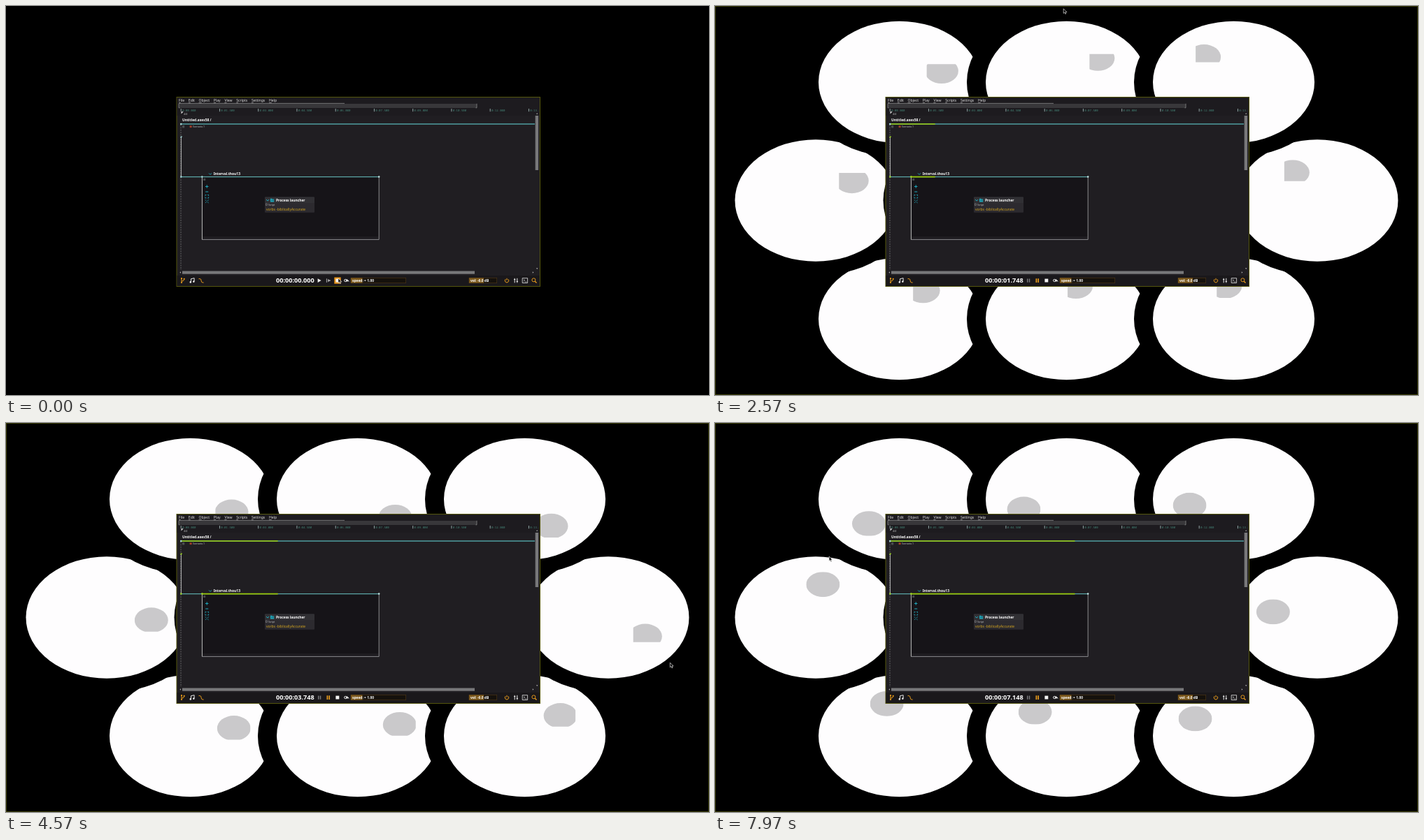
An HTML page with a canvas for the animation above (8 s loop, 1005x557 px).

```html
<!DOCTYPE html>
<html lang="en">
<head>
<meta charset="utf-8">
<title>Timeline with watching eyes</title>
<style>
  html, body { margin: 0; width: 100%; height: 100%; overflow: hidden; background: #000; }
  canvas, svg { position: absolute; left: 0; top: 0; width: 1005px; height: 557px; display: block; }
  text { font-family: "Noto Sans", "Open Sans", sans-serif; font-size: 5.1px; fill: #e0e0e0; white-space: pre; }
  .bold { font-weight: 700; font-size: 4.93px; fill: #fff; }
  .small { font-size: 3.5px; fill: #c0c0c0; }
  .mono { font-family: "Noto Sans Mono", "DejaVu Sans Mono", monospace; font-size: 4.06px; fill: #458577; }
  .clock { font-size: 9.15px; }
  .code { font-size: 4.95px; fill: #d3a51f; }
  .key { text-decoration: underline; }
  .line { fill: none; }
  .teal { stroke: #1fa9bd; }
  .white { stroke: #e6e6e6; }
  .grey { stroke: #88888a; }
  .orange { stroke: #e69a1c; }
  .green { stroke: #98c80a; }
  .list { stroke: #737b7c; stroke-width: 3.2; stroke-dasharray: .6 .6; }
  .bar { fill: #78787a; }
</style>
</head>
<body>
<canvas id="eyes" width="1005" height="557"></canvas>
<svg viewBox="0 0 1005 557">
  <defs><clipPath id="inside"><rect x="245" y="131" width="517" height="270"/></clipPath></defs>
  <rect id="edge" x=".5" y=".5" width="1004" height="556" fill="none" stroke="#3b3d08"/>

  <rect x="244" y="130.5" width="519.5" height="271" fill="#201e22" stroke="#55560d"/>
  <rect x="244.5" y="131" width="518.5" height="26" fill="#1d1b1f"/>
  <rect x="244.5" y="386" width="518.5" height="15" fill="#1a181b"/>
  <text id="menu" y="137"></text>

  <!-- overview and ruler -->
  <rect x="247" y="140" width="426" height="6" fill="#38373a"/>
  <path d="M247 139.4H484M248.5 145.8h-1.5v-6M671.5 145.8h1.5v-6" class="line grey" stroke-width=".8"/>
  <g id="ruler" clip-path="url(#inside)"></g>
  <path d="M250.5 151.2h3.2l-3.2 3.2z" fill="#ddd"/>
  <text x="254" y="155.5" class="small">4/4</text>
  <text x="252" y="165" class="bold">Untitled.axes58 /</text>

  <!-- root interval -->
  <path d="M250 169H756" class="line" stroke="#4f9c9f" stroke-width="1.3"/>
  <path d="M253.6 171.2v3" class="line list"/>
  <rect x="262.6" y="171.3" width="3" height="2.8" fill="#a23f2c"/>
  <text x="267" y="174.2" class="small">Scenario.1</text>
  <path d="M250 170V378" class="line" stroke="#77767a" stroke-width=".8" stroke-dasharray="2 1.4"/>
  <path d="M250.4 188V244" class="line" stroke="#c9c9c9" stroke-width=".9"/>

  <!-- nested interval -->
  <rect x="280" y="245" width="253" height="89.5" fill="#161418"/>
  <rect x="281" y="330" width="252" height="4" fill="#1e1c20"/>
  <path d="M280.3 334.4H533.2V245" class="line" stroke="#98989a" stroke-width=".9"/>
  <path d="M280.4 245V334.4" class="line" stroke="#d0d0d0" stroke-width=".9"/>
  <path d="M250 244.6H533" class="line" stroke="#5aa5a5" stroke-width="1.2"/>
  <path d="M290 239.4l2 2 2-2" class="line teal" stroke-width=".9"/>
  <text x="296.7" y="242.1" class="bold">Interval.thou13</text>
  <path d="M283.6 247v3" class="line list"/>
  <path d="M285 258.5h4.4M287.2 256.3v4.4M285.2 266h4" class="line teal"/>
  <rect x="285" y="270.4" width="4.6" height="4.6" class="line teal" stroke-dasharray="1.4 1.8 1.4 0" stroke-width=".9"/>
  <path d="M285 277.6l4.6 4.4M289.6 277.6l-4.6 4.4" class="line teal" stroke-dasharray="2.2 1.9" stroke-width=".9"/>

  <!-- process -->
  <rect x="370" y="273.5" width="71" height="22.3" rx="1" fill="#2c2a2f"/>
  <rect x="370" y="273.5" width="71" height="8.5" rx="1" fill="#313034"/>
  <path d="M372 277l2.1 2.1 2.1-2.1" class="line teal"/>
  <path d="M378 275.8h2l.7.8h2.5v3.8h-5.2z" fill="#1fa9bd"/>
  <path d="M379 278.2h4" class="line" stroke="#16404a" stroke-width=".7"/>
  <text x="386" y="279.5" class="bold">Process launcher</text>
  <rect x="371.4" y="283" width="2.1" height="2.4" class="line grey" stroke-width=".6"/>
  <text x="375" y="285.6" class="small">Script</text>
  <text x="372" y="292.6" class="code">vorbs -biblicallyAccurate</text>

  <!-- progress and handles -->
  <path id="rootBar" class="line green" stroke-width="1.7"/>
  <path id="subBar" class="line green" stroke-width="1.7"/>
  <g id="dots">
    <circle cx="250.2" cy="169" r="1.3" fill="#a8dada"/>
    <path d="M249.6 186.6h2.2v1.1h-1v1.2h-1.2z"/>
    <circle cx="250.3" cy="244.5" r="1.2"/>
    <circle cx="280.3" cy="244.5" r="1.2"/>
    <circle cx="533.2" cy="244.5" r="1.2" fill="#c9eeee"/>
  </g>

  <!-- scroll bars -->
  <rect x="756.7" y="157" width="4.4" height="78" class="bar"/>
  <rect x="252" y="379.5" width="418" height="4.2" class="bar"/>
  <path d="M758 154.8h2.4l-1.2-1.6zM758 375.3h2.4l-1.2 1.6zM250 380.3v2.4l-1.6-1.2zM752.8 380.3v2.4l1.6-1.2z" fill="#b5b5b5"/>

  <!-- transport -->
  <path d="M251 390.2v5.8M251 394.2q3.7 0 3.7-3.4" class="line orange"/>
  <path d="M251 390.2h0M251 396h0M254.7 390.8h0" class="line orange" stroke-width="2.2" stroke-linecap="round"/>
  <path d="M264.5 395.3v-4.6l4.6-1v4.6" class="line white"/>
  <path d="M263.8 395.4h0M268.3 394.6h0" class="line white" stroke-width="2.6" stroke-linecap="round"/>
  <path d="M275.5 390.6h1.6q2 0 2 2.6t2 2.8h1.5" class="line orange"/>
  <text id="clock" x="386" y="396.3" class="bold clock"></text>
  <g id="idle">
    <path d="M445.6 390.2v5.8l5-2.9z" fill="#eee"/>
    <path d="M458.4 390.3v5.6M460 393.1h4" class="line" stroke="#aaa"/>
    <path d="M460.3 390.8v4.6l3-2.3z" fill="#aaa"/>
  </g>
  <g id="busy">
    <path d="M446.7 390.4v5.4M449.5 390.4v5.4" class="line" stroke="#77777a" stroke-width="1.5"/>
    <path d="M459.4 390.2v5.8M462.2 390.2v5.8" class="line orange" stroke-width="1.7"/>
  </g>
  <rect id="hover" x="469.3" y="388.5" width="9.4" height="9.2" fill="#e8951a"/>
  <rect x="471.4" y="390.6" width="4.9" height="4.9" fill="#f4f4f4"/>
  <circle cx="485.3" cy="393" r="1.7" class="line white"/>
  <path d="M485.5 393l2.6-2.2v1.2q2.3.4 2.5 3.2q-1-1.2-2.5-1.1v1.2z" fill="#e6e6e6"/>
  <g id="sliders"></g>
  <path d="M714.2 391.2a2.7 2.7 0 1 0 3.6 0M716 389.8v3" class="line orange"/>
  <path d="M727.2 389.8v6.6M730.8 389.8v6.6M726 391.6h2.4M729.6 394.4h2.4" class="line white"/>
  <path d="M738.2 389.7h7.4v6.8h-7.4zM740 391.5l1.6 1.5-1.6 1.5M742.4 394.9h1.8" class="line white" stroke-width=".8"/>
  <circle cx="754.4" cy="392.3" r="2.5" class="line orange"/>
  <path d="M756.2 394.2l2.3 2.3" class="line orange" stroke-width="1.4"/>

  <path id="cursor" d="M0 0v6.6l1.5-1.4 1.1 2.4 1.1-.5-1-2.3h2.1z" fill="#000" stroke="#fff" stroke-width=".6"/>
</svg>
<script>
const $ = id => document.getElementById(id);
const LOOP = 8000, START = 823, OPEN = 1650, LAG = 33;
const CX = 502.5, CY = 278.5;

// The pointer circles the window: time, angle in degrees, radius
const orbit = [
  [0, 98, .45], [850, 105, .47], [1700, 54, .414], [1880, 54, .414],
  [2530, -431, 1.1], [3200, -587, .968], [3350, -587, .968],
  [4570, -345.8, 1.048], [4700, -334, 1.048], [5200, -222, .97],
  [5560, -295.5, .975], [5670, -304, .986], [6060, -355, .995],
  [6850, -440.5, .7], [7030, -441.6, .7], [7500, -482, .95], [7970, -515.6, .847]
];

const rate = (i, k) => (orbit[i + 1][k] - orbit[i][k]) / (orbit[i + 1][0] - orbit[i][0]);

// zero at turning points and rests, otherwise weighted by the shorter side
function slope(i, k) {
  if (i === 0 || i === orbit.length - 1) return 0;
  const l = rate(i - 1, k), r = rate(i, k);
  if (l * r <= 0) return 0;
  const hl = orbit[i][0] - orbit[i - 1][0], hr = orbit[i + 1][0] - orbit[i][0];
  return (l * hr + r * hl) / (hl + hr);
}

function pointer(t) {
  const last = orbit.length - 1;
  t = Math.min(Math.max(t, 0), orbit[last][0]);
  let i = 0;
  while (i < last - 1 && orbit[i + 1][0] < t) i++;
  const a = orbit[i], b = orbit[i + 1], d = b[0] - a[0], u = (t - a[0]) / d, v = 1 - u;
  const [angle, r] = [1, 2].map(k =>
    v * v * (1 + 2 * u) * a[k] + u * u * (3 - 2 * u) * b[k] +
    u * v * d * (v * slope(i, k) - u * slope(i + 1, k)));
  const q = angle * Math.PI / 180;
  return [CX + 440 * r * Math.cos(q), CY + 250 * r * Math.sin(q)];
}

// Rows from the bottom up, so that upper outlines cut into lower eyes
const sites = [3, 4, 3].flatMap((count, row) =>
  Array.from({ length: count }, (_, i) =>
    [CX + 239 * (i - (count - 1) / 2), CY + 169.5 * (1 - row)]));
const ctx = $("eyes").getContext("2d");

function oval(x, y, rx, ry, fill) {
  ctx.beginPath();
  ctx.ellipse(x, y, rx, ry, 0, 0, 2 * Math.PI);
  ctx.fillStyle = fill;
  ctx.fill();
}

function pupil([ex, ey], [mx, my]) {
  const dx = mx - ex, dy = my - ey;
  const k = 1 / Math.max(1, Math.hypot(dx / 64, dy / 48));
  return [ex + dx * k, ey + dy * k];
}

const limit = v => Math.max(-12, Math.min(12, v));

function drawEyes(t) {
  ctx.clearRect(0, 0, 1005, 557);
  if (t < OPEN) return;
  const now = pointer(t - LAG), old = pointer(t - 2 * LAG);
  for (const eye of sites) {
    const [x, y] = pupil(eye, now), [px, py] = pupil(eye, old);
    oval(...eye, 142.5, 107.8, "#000");
    oval(...eye, 115.5, 87.3, "#fefdfe");
    // a moving pupil is only repainted inside its previous box
    ctx.save();
    ctx.beginPath();
    ctx.rect(x + limit(px - x) - 24, y + limit(py - y) - 18, 48, 36);
    ctx.clip();
    oval(x, y, 24, 18, "#cac9cb");
    ctx.restore();
  }
}

const pad = (n, w) => String(n).padStart(w, "0");
const show = (id, on) => $(id).style.display = on ? "" : "none";

$("menu").innerHTML = "File Edit Object Play View Scripts Settings Help".split(" ").map((s, i) =>
  `<tspan class="key" ${i ? 'dx="5.65"' : 'x="247"'}>${s[0]}</tspan>${s.slice(1)}`).join("");

$("ruler").innerHTML = Array.from({ length: 10 }, (_, i) => {
  const x = 250.2 + i * 55.25;
  return `<path d="M${x} 147v4.2" class="line" stroke="#9fb5b5" stroke-width=".9"/>
    <text class="mono" x="${x + 1.8}" y="150.9">0:${pad((i * 1.5).toFixed(3), 6)}</text>`;
}).join("");

const slider = (x, width, filled, label) =>
  `<rect x="${x}" y="389.3" width="${width}" height="7.4" fill="#15110c" stroke="#4a3515" stroke-width=".7"/>
   <rect x="${x}" y="389.3" width="${filled}" height="7.4" fill="#7c591d"/>
   <text x="${x + 2}" y="394.7" class="bold">${label}</text>`;
$("sliders").innerHTML = slider(493, 78.7, 16.5, "speed: × 1.00") + slider(662, 39.7, 21, "vol: -6.0 dB");

function draw(t) {
  const run = Math.max(0, Math.floor(t - START)), playing = t >= START;
  const [x, y] = pointer(t), head = 250 + run * 0.037;
  drawEyes(t);
  show("edge", t >= OPEN);
  show("idle", !playing);
  show("busy", playing);
  show("hover", Math.abs(x - 474) < 5 && Math.abs(y - 393) < 5);
  $("clock").textContent = `00:00:${pad(Math.floor(run / 1000), 2)}.${pad(run % 1000, 3)}`;
  $("rootBar").setAttribute("d", playing ? `M250 169H${head}` : "");
  $("subBar").setAttribute("d", head > 280 ? `M280 244.6H${Math.min(head, 533)}` : "");
  $("dots").setAttribute("fill", playing ? "#a6e02a" : "#a8dada");
  $("cursor").setAttribute("transform", `translate(${x} ${y})`);
}

const begin = performance.now();
function frame() {
  draw((performance.now() - begin) % LOOP);
  requestAnimationFrame(frame);
}
frame();
</script>
</body>
</html>
```
